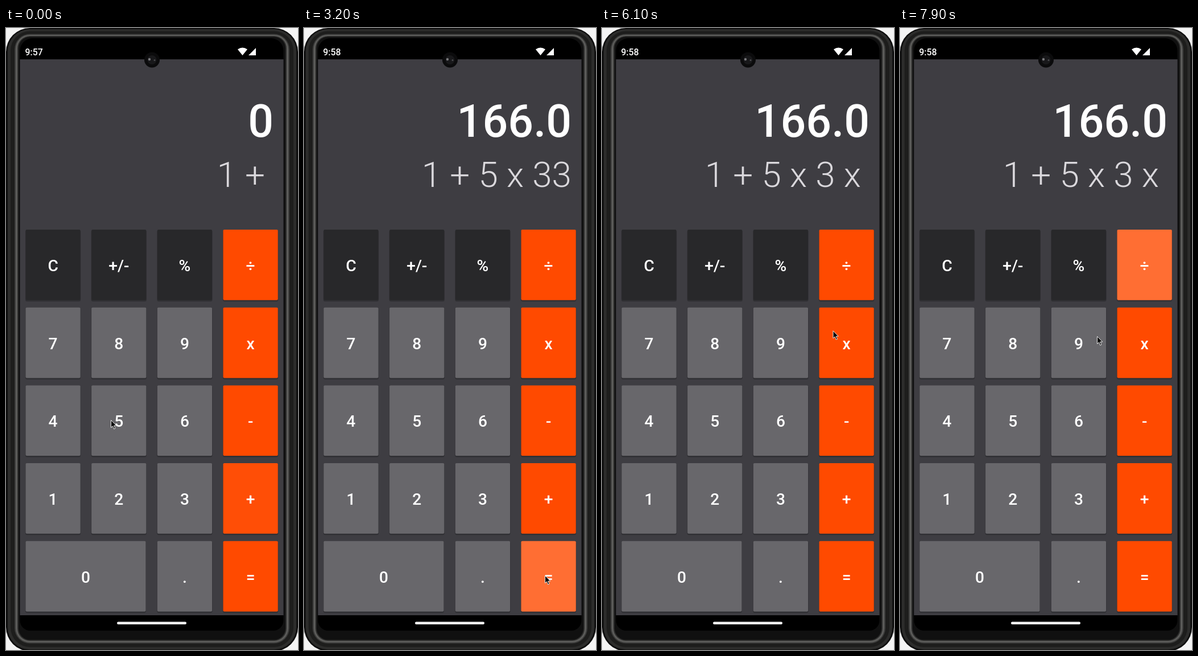
These frames come from a looping animation (513x1092 px, 8000 ms). An HTML page with a canvas:

```html
<!DOCTYPE html>
<html lang="en">
<head>
<meta charset="utf-8">
<title>Calculator</title>
<style>
html, body { margin: 0; width: 100%; height: 100%; overflow: hidden; background: #f4f4f4; }
canvas { display: block; }
</style>
</head>
<body>
<canvas id="stage" width="513" height="1092"></canvas>
<script>
const ctx = document.getElementById('stage').getContext('2d');
const LOOP = 8000, STEP = 100;
const clamp = v => Math.max(0, Math.min(1, v));
const ease = u => u * u * (3 - 2 * u);

// Keypad on a regular grid
const keys = {};
['C ± % ÷', '7 8 9 x', '4 5 6 -', '1 2 3 +', '0 _ . ='].forEach((line, row) =>
  line.split(' ').forEach((id, col) => {
    keys[id] = {
      label: id === '±' ? '+/-' : id,
      x: 34.5 + col * 115.67, y: 354 + row * 136.7,
      w: id === '0' ? 211 : 96.2, h: 123.7,
      color: col === 3 ? '#ff4a00' : row === 0 ? '#28282a' : '#68676b'
    };
  }));
delete keys._;

// Where the pointer is heading and what it taps; the key centre is the default place
const stop = (time, id, x, y) => {
  const key = keys[id];
  return { time, id, key, x: x ?? key.x + key.w / 2, y: y ?? key.y + key.h / 2 };
};
const stops = [
  stop(-420, '+'), stop(0, '', 184, 688), stop(150, '5', 184, 688), stop(550, 'x'),
  stop(1050, '3', 300, 850), stop(1950, '3', 300, 850), stop(3020, '=', 423, 961),
  stop(4313, 'C'), stop(4600, '', 459, 509), stop(5150, 'x', 447, 565),
  stop(6438, '%', 279, 428), stop(7700, '÷'), stop(7900, '', 346, 541)
];

function cursorAt(t) {
  const next = stops.find(s => s.time >= t) || stops.at(-1);
  const prev = stops[stops.indexOf(next) - 1];
  const leave = Math.max(prev.time + 50, next.time - 500);
  const u = ease(clamp((t - leave) / (next.time - leave)));
  return [prev.x + (next.x - prev.x) * u, prev.y + (next.y - prev.y) * u];
}

const evaluate = formula => formula.split(' + ')
  .reduce((sum, term) => sum + term.split(' x ').reduce((p, n) => p * n, 1), 0);

function displayAt(t) {
  let formula = '1', result = '0';
  for (const { time, id } of stops) {
    if (time > t || !id) continue;
    if (id === '=') result = evaluate(formula).toFixed(1);
    else if (id === 'C') formula = formula.slice(0, -1);
    else if (/\d/.test(id)) formula += id;
    else if (!formula.endsWith(' ')) formula += ` ${id} `;
  }
  return { formula, result };
}

function box(x, y, w, h, r, fill) {
  ctx.beginPath();
  ctx.roundRect(x, y, w, h, r);
  ctx.fillStyle = fill;
  ctx.fill();
}

function disc(x, y, r, fill) {
  box(x - r, y - r, 2 * r, 2 * r, r, fill);
}

function text(str, x, y, font, fill, align) {
  ctx.font = font + ' Roboto, sans-serif';
  ctx.fillStyle = fill;
  ctx.textAlign = align;
  ctx.fillText(str, x, y);
}

// Rounded frame layer, inset from the stage edge
function shell(inset, fill) {
  box(inset, inset * .7, 513 - 2 * inset, 1094 - 1.6 * inset, 42 - inset, fill);
}

function drawPhone(t) {
  ctx.fillStyle = '#f4f4f4';
  ctx.fillRect(0, 0, 513, 1092);
  box(85, 0, 365, 5, 1, '#222');
  shell(0, '#0e0e0e');
  shell(3, '#2c2c2b');
  shell(8, '#1d1d1c');
  shell(15, '#3c3c3b');
  shell(17, '#5c5c5a');
  shell(20, '#2e2e2d');
  shell(22, '#101010');
  box(24.5, 18, 463, 1040, [22, 22, 18, 18], '#000');
  box(24.5, 55, 463, 976, 0, '#3e3d42');

  text(t < 1500 ? '9:57' : '9:58', 33.5, 48, '500 15.8px', '#fff', 'left');
  ctx.fillStyle = '#fff';
  ctx.fill(new Path2D('M415.5 48L407 37.5Q415.5 31.5 424 37.5ZM426 48H439V35Z'));

  disc(256.5, 56, 13.5, '#0b0b0c');
  disc(256.5, 56, 8, '#18181a');
  disc(252, 55, 2.2, '#77777a');
  disc(261, 56.5, 1.5, '#4a4a4d');
  box(195, 1042.5, 122, 4.5, 2.2, '#f5f5f5');
}

function drawRipple({ key, x, y }, age) {
  if (age < 0 || age > 450) return;
  const alpha = .2 * clamp(age / 90) * clamp((450 - age) / 250);
  const radius = 8 + 160 * clamp(age / 190) ** 2;
  const glow = ctx.createRadialGradient(x, y, radius * .7, x, y, radius * 1.1);
  glow.addColorStop(0, `rgba(255,255,255,${alpha})`);
  glow.addColorStop(1, 'rgba(255,255,255,0)');
  box(key.x, key.y, key.w, key.h, 2, glow);
}

function drawKeys(t) {
  const all = Object.values(keys);
  for (const { x, y, w, h, color } of all) {
    box(x - .5, y + 1, w + 1, h + 1.5, 3, 'rgba(0,0,0,.22)');
    box(x, y, w, h, 2, color);
  }
  for (const s of stops) if (s.key) drawRipple(s, t - s.time);
  for (const { label, x, y, w } of all)
    text(label, x + w / 2, y + 73, '500 28.2px', '#fff', 'center');
}

const arrow = new Path2D('M0 0V13L3 10.3L5.2 15.5L7.4 14.5L5.2 9.5H9.3Z');

function drawCursor([x, y]) {
  ctx.save();
  ctx.translate(x + .5, y + .5);
  ctx.fillStyle = '#000';
  ctx.strokeStyle = '#e8e8e8';
  ctx.fill(arrow);
  ctx.stroke(arrow);
  ctx.restore();
}

function draw(now) {
  const t = Math.floor(now % LOOP / STEP) * STEP;
  const { formula, result } = displayAt(t);
  drawPhone(t);
  text(result, 470, 191, '500 78.9px', '#fff', 'right');
  text(formula, 470, 278.5, '300 62px', '#dad8dc', 'right');
  drawKeys(t);
  drawCursor(cursorAt(t));
}

const start = performance.now();
(function tick() {
  draw(performance.now() - start);
  requestAnimationFrame(tick);
})();
</script>
</body>
</html>
```
